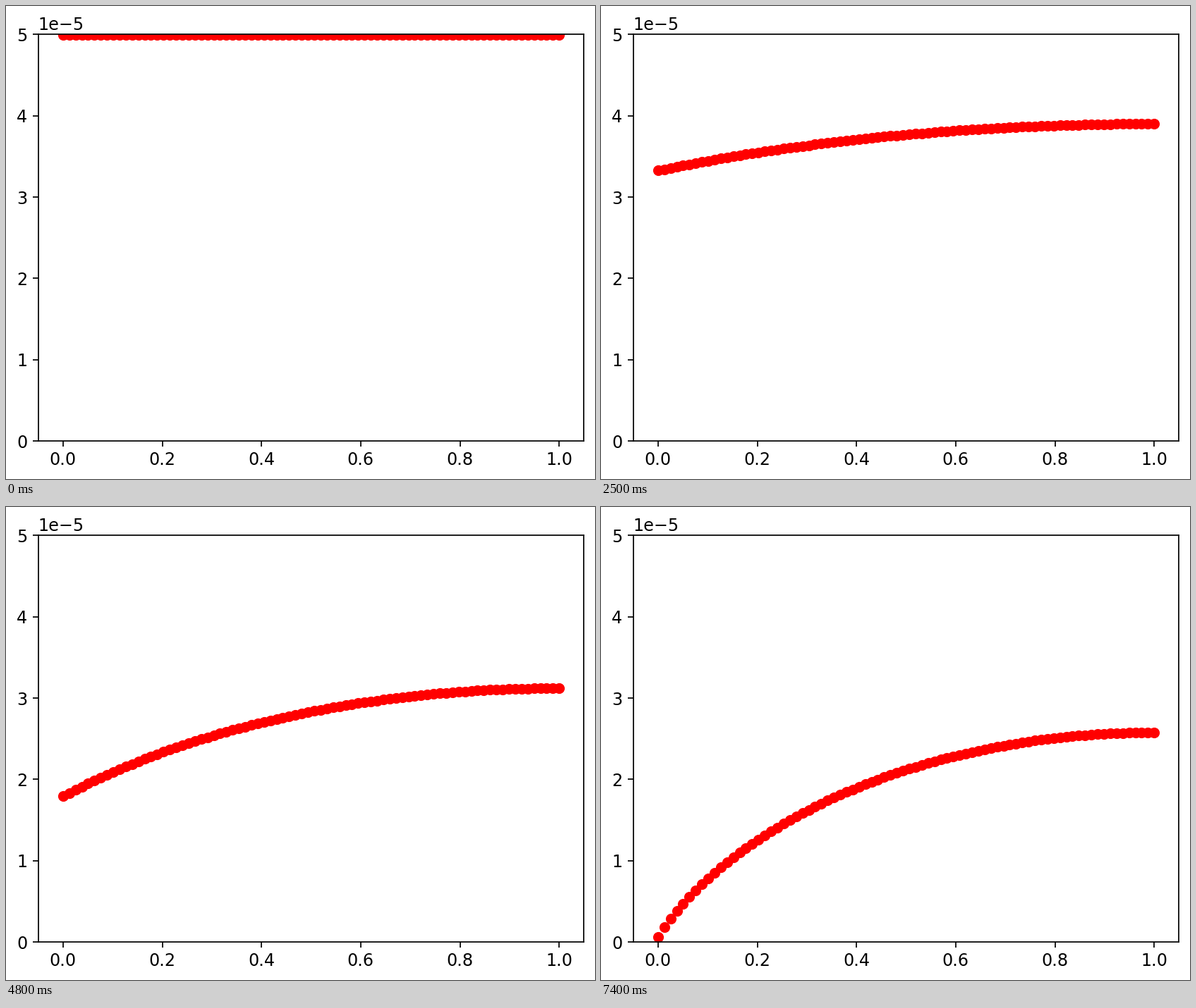
These frames come from a looping animation (835x671 px, 7500 ms). A matplotlib script:

```python
import numpy as np
import matplotlib.pyplot as plt
from matplotlib.animation import FuncAnimation

WIDTH, HEIGHT, DPI = 835, 671, 156
FRAMES, INTERVAL = 75, 100
NODES, SUBSTEPS = 80, 10
RADIUS = 5.0        # starting pore radius, in units of 1e-5
GROWTH = 0.0667     # wall growth at the mouth, per frame
SINK = 18.4         # wall reaction strength over diffusion

x = np.linspace(0, 1, NODES)
dx = x[1] - x[0]


def concentration(r):
    """Solve c'' = SINK c / r^2 with c(0) = 1 and c'(1) = 0."""
    lower = np.full(NODES - 1, -1.0)
    upper = lower.copy()
    lower[-1] = -2
    a = np.diag(2 + SINK * dx**2 / r**2) + np.diag(lower, -1) + np.diag(upper, 1)
    a[0] = 0
    a[0, 0] = 1
    b = np.zeros(NODES)
    b[0] = 1
    return np.linalg.solve(a, b)


def simulate():
    """Radius profile for every frame, one substep in at the start."""
    r = np.full(NODES, RADIUS)
    out = []
    for step in range((FRAMES - 1) * SUBSTEPS + 1):
        r = r - GROWTH / SUBSTEPS * concentration(r)
        if step % SUBSTEPS == 0:
            out.append(r * 1e-5)
    return out


profiles = simulate()

plt.rcParams.update({"font.family": "DejaVu Sans", "font.size": 11})
fig = plt.figure(figsize=((WIDTH + 1e-6) / DPI, (HEIGHT + 1e-6) / DPI), dpi=DPI)
ax = fig.add_axes([45.65 / WIDTH, 54 / HEIGHT, 773.76 / WIDTH, 576.58 / HEIGHT])
ax.set_xlim(-0.05, 1.05)
ax.set_ylim(0, 5e-5)
dots, = ax.plot(x, profiles[0], "ro")


def draw(i):
    dots.set_ydata(profiles[i])
    return dots,


anim = FuncAnimation(fig, draw, frames=FRAMES, interval=INTERVAL,
                     repeat=True, repeat_delay=0)
plt.show()
```
